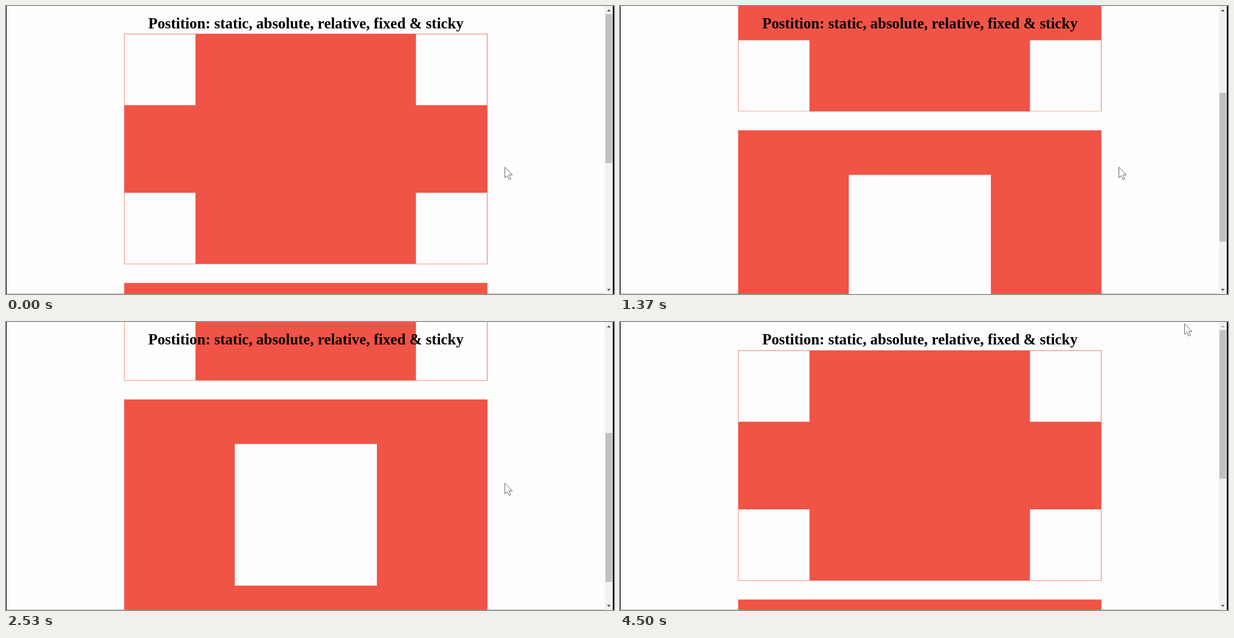
Write an HTML page that moves like this. It is 1000x475 px and loops after 5130 ms.

```html
<!DOCTYPE html>
<html lang="en">
<head>
<meta charset="utf-8">
<title>CSS position demo</title>
<style>
  html, body { margin: 0; width: 100%; height: 100%; overflow: hidden; background: #fdfdfd; }
  svg { display: block; width: 1000px; height: 475px; }
  text { font: bold 24.9px "Liberation Serif", "Times New Roman", serif; font-variant-ligatures: none; }
  .box { fill: #f05446; }
  .hole { fill: #fdfdfd; }
</style>
</head>
<body>
<svg viewBox="0 0 1000 475">
  <rect width="1000" height="475" fill="#fdfdfd"/>
  <rect y="474" width="1000" height="1" fill="#c4c4c4"/>
  <g id="page">
    <rect class="box" x="194.3" y="46.7" width="597.5" height="379.9"/>
    <path class="hole" d="M194.9 47.4h116.7v117H194.9z M674.3 47.4H791v117H674.3z
      M194.9 309.1h116.7v117H194.9z M674.3 309.1H791v117H674.3z"/>
    <rect class="box" x="194.3" y="457.7" width="597.5" height="380"/>
    <rect class="hole" x="376.3" y="531.2" width="233.7" height="233.6"/>
  </g>
  <text x="493.3" y="37.3" text-anchor="middle">Postition: static, absolute, relative, fixed &amp; sticky</text>
  <rect x="985" width="13" height="475" fill="#f1f1f1"/>
  <rect id="thumb" x="986" width="11" height="245.5" fill="#c1c1c1"/>
  <path id="up" d="M988.5 9l3-3.5 3 3.5z"/>
  <path id="down" d="M988.5 466.5l3 3.5 3-3.5z"/>
  <rect width="1" height="475"/>
  <rect x="998" width="2" height="475"/>
  <path id="cursor" d="M.5 .8V18.3L4.4 14.8 7.4 21.2 10.2 19.9 7.3 13.6H12.9Z"
    fill="#fff" stroke="#55555f" stroke-width=".9"/>
</svg>
<script>
const LOOP = 5130, MAX_SCROLL = 392;

const wheel = [
  [0, 3, 1], [260, 1, 62],
  [910, 5, 154], [1630, 2, 318.5], [1890, 1, MAX_SCROLL],
  [2530, 4, 330], [3070, 2, 143], [3360, 1, 0]
];
const pointer = [
  [0, 1, 820, 265], [3540, 1, 822, 265],
  [3930, 3, 906, 91], [4360, 1, 942, -1], [4500, 1, 928, 2]
];

const linear = p => p;
const easeOut = p => 1 - (1 - p) ** 2;

function sample(keys, t, ease) {
  const i = keys.findLastIndex(k => k[0] <= t);
  const [from, steps, ...values] = keys[i];
  const [to, , ...next] = keys[i + 1] ?? [LOOP, 1, ...values];
  const p = ease(Math.floor((t - from) / (to - from) * steps + 1e-6) / steps);
  return values.map((v, j) => v + (next[j] - v) * p);
}

const el = id => document.getElementById(id);
const arrowColor = active => active ? "#505050" : "#b0b0b0";

function draw(t) {
  const [scroll] = sample(wheel, t, linear);
  const [x, y] = sample(pointer, t, easeOut);
  el("page").setAttribute("transform", `translate(0 ${-scroll})`);
  el("thumb").setAttribute("y", 13 + scroll * 0.515);
  el("up").setAttribute("fill", arrowColor(scroll > 0));
  el("down").setAttribute("fill", arrowColor(scroll < MAX_SCROLL));
  el("cursor").setAttribute("transform", `translate(${x} ${y})`);
}

let start;
function tick(now) {
  start ??= now;
  draw((now - start) % LOOP);
  requestAnimationFrame(tick);
}
draw(0);
requestAnimationFrame(tick);
</script>
</body>
</html>
```
